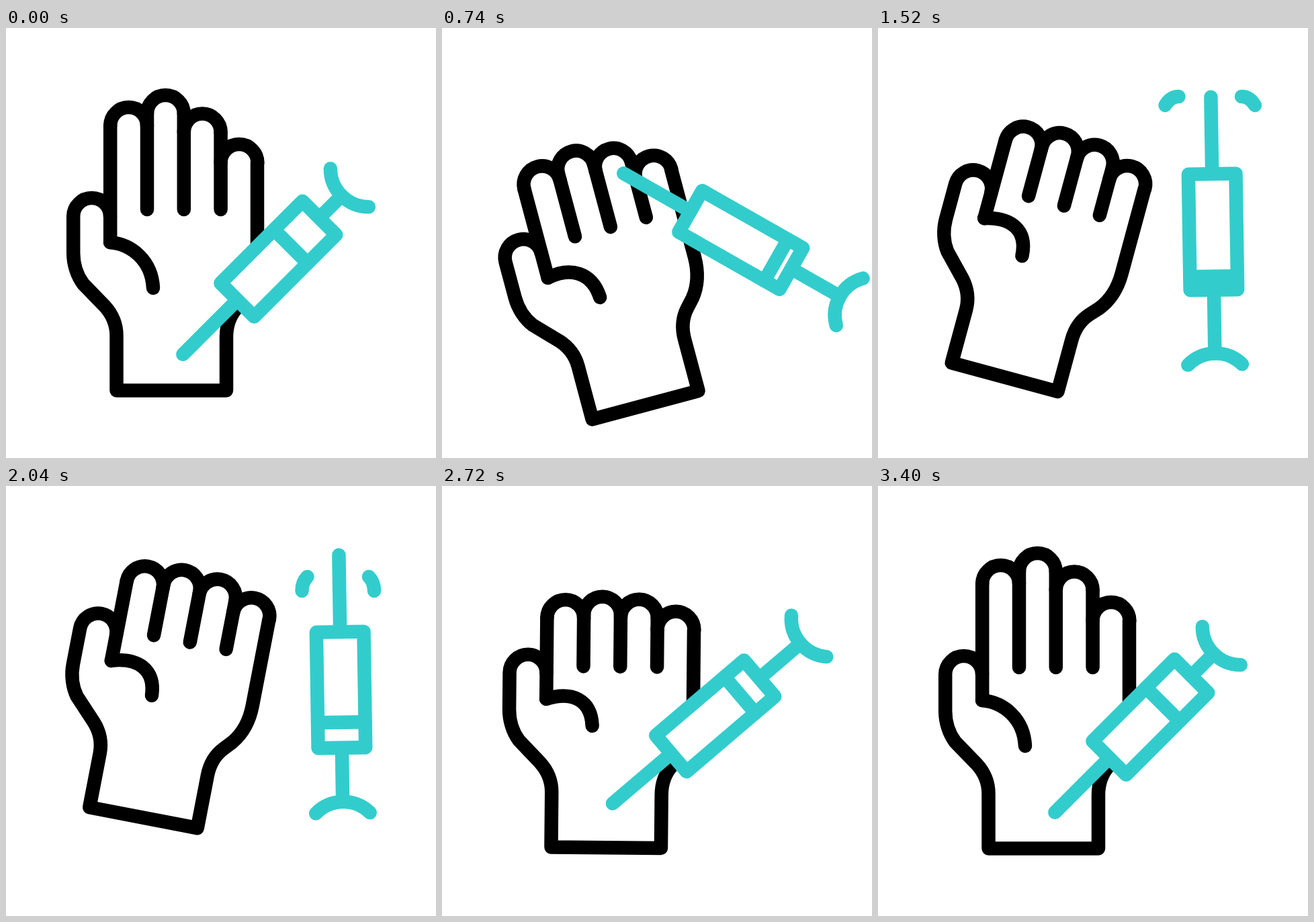
Write an HTML page with a canvas that moves like this. It is 640 px wide and 640 px high and loops after 3.6 s.

```html
<!DOCTYPE html>
<html>
<head>
<meta charset="utf-8">
<style>
html, body { margin: 0; height: 100%; overflow: hidden; background: #fff; }
canvas { display: block; }
</style>
</head>
<body>
<canvas id="stage" width="640" height="640"></canvas>
<script>
const ctx = document.getElementById('stage').getContext('2d');
const LOOP = 3600, STEP = 20, TEAL = '#33cccc';
const R = 27.4; // finger radius
const rad = deg => deg * Math.PI / 180;
const mix = (a, b, k) => a + (b - a) * k;

// cubic-bezier(.42, 0, .58, 1)
function ease(x) {
  let t = x;
  for (let i = 0; i < 5; i++)
    t -= (1.26 * t - .78 * t * t + .52 * t ** 3 - x) / (1.26 - 1.56 * t + 1.56 * t * t);
  return t * t * (3 - 2 * t);
}

// value of a list of [time, value] keys, eased between neighbours
function track(t, keys) {
  if (t <= keys[0][0]) return keys[0][1];
  for (let i = 1; i < keys.length; i++) {
    const [t0, a] = keys[i - 1], [t1, b] = keys[i];
    if (t < t1) return mix(a, b, ease((t - t0) / (t1 - t0)));
  }
  return keys[keys.length - 1][1];
}

function stroke(draw, fill) {
  ctx.beginPath();
  draw();
  if (fill) { ctx.fillStyle = '#fff'; ctx.fill(); }
  ctx.stroke();
}

function line(x0, y0, x1, y1) {
  stroke(() => { ctx.moveTo(x0, y0); ctx.lineTo(x1, y1); });
}

function hand(t) {
  const fist = track(t, [[220, 0], [1060, 1], [2900, 1], [3400, 0]]);
  const lift = track(t, [[220, 0], [1060, 45.3], [1845, -47.3], [2840, 0]]);
  const turn = track(t, [[220, 0], [886, -16.6], [1540, 15.2], [2900, 0]]);
  const tops = [[145.5, 53], [127.5, 66], [155, 42], [200.5, 14]].map(([y, drop]) => y + drop * fist);

  ctx.save();
  ctx.translate(237, 320 + lift);
  ctx.rotate(rad(turn));
  ctx.translate(-237, -320);
  ctx.strokeStyle = '#000';

  // thumb, wrist and outer side
  stroke(() => {
    ctx.arc(127.6, 280.5, R, 0, Math.PI, true);
    ctx.lineTo(100.2, 335);
    ctx.bezierCurveTo(100.2, 352, 106, 369, 115, 381);
    ctx.lineTo(147, 414);
    ctx.bezierCurveTo(158, 426, 164.5, 441, 164.5, 458);
    ctx.lineTo(164.5, 539.5);
    ctx.lineTo(328, 539.5);
    ctx.lineTo(328, 460);
    ctx.bezierCurveTo(328, 442, 333, 428, 344, 416);
    ctx.lineTo(355, 404);
    ctx.bezierCurveTo(368, 388, 374, 368, 374, 345);
    ctx.lineTo(374, tops[3]);
  });

  // fingers
  tops.forEach((y, i) => {
    const x = 155.2 + 2 * R * i;
    stroke(() => ctx.arc(x + R, y, R, Math.PI, 0));
    line(x, i ? Math.min(y, tops[i - 1]) : y, x, i ? 270 : 319);
  });

  // crease of the thumb
  stroke(() => {
    ctx.moveTo(155, 319);
    ctx.bezierCurveTo(
      155 + mix(33, 38, fist), 319 + mix(3, -12, fist),
      155 + mix(62, 67, fist), 319 + mix(28, 0, fist),
      155 + mix(64, 69, fist), 319 + mix(68, 39.5, fist));
  });
  ctx.restore();
}

function syringe(t) {
  const swing = track(t, [[220, 0], [1196, 1], [2140, 1], [2807, 0]]);
  const pull = (full, low) => track(t, [[220, 0], [1180, full], [1840, low], [2900, low], [3400, 0]]);
  const piston = 3.5 + pull(60, 22);
  const handle = 127.5 + pull(63.5, 33.3);

  ctx.save();
  ctx.translate(mix(421.4, 498.9, swing), mix(327.6, 326.2, swing));
  ctx.rotate(rad(mix(-45, 89.1, swing)));
  line(-223.5, 0, -109, 0);
  line(63.5, 0, handle - 17, 0);
  stroke(() => ctx.arc(handle + 40, 0, 57, rad(135), rad(225)));
  stroke(() => ctx.rect(-109, -35.3, 172.5, 70.6), true);
  line(piston, -35.3, piston, 35.3);
  ctx.restore();
}

function drops(t) {
  if (t <= 1320 || t >= 2140) return;
  // start, control and end of the right drop: high and low pose
  const high = [541, 102, 553, 102, 561, 115];
  const low = [540, 135, 548, 143, 548, 156];
  const p = high.map((v, i) => track(t, [
    [1320, i % 2 ? 103 : 495], [1520, v], [2040, low[i]], [2140, low[4 + i % 2]]]));
  ctx.lineWidth = track(t, [[2040, 20.5], [2140, 0]]);
  for (const flip of [false, true]) {
    const x = v => flip ? 988.5 - v : v;
    stroke(() => {
      ctx.moveTo(x(p[0]), p[1]);
      ctx.quadraticCurveTo(x(p[2]), p[3], x(p[4]), p[5]);
    });
  }
}

function frame(now) {
  const t = Math.floor(now % LOOP / STEP) * STEP;
  ctx.fillStyle = '#fff';
  ctx.fillRect(0, 0, 640, 640);
  ctx.lineCap = ctx.lineJoin = 'round';
  ctx.lineWidth = 20.5;
  hand(t);
  ctx.strokeStyle = TEAL;
  syringe(t);
  drops(t);
}

const start = performance.now();
function tick() {
  frame(performance.now() - start);
  requestAnimationFrame(tick);
}
tick();
</script>
</body>
</html>
```
